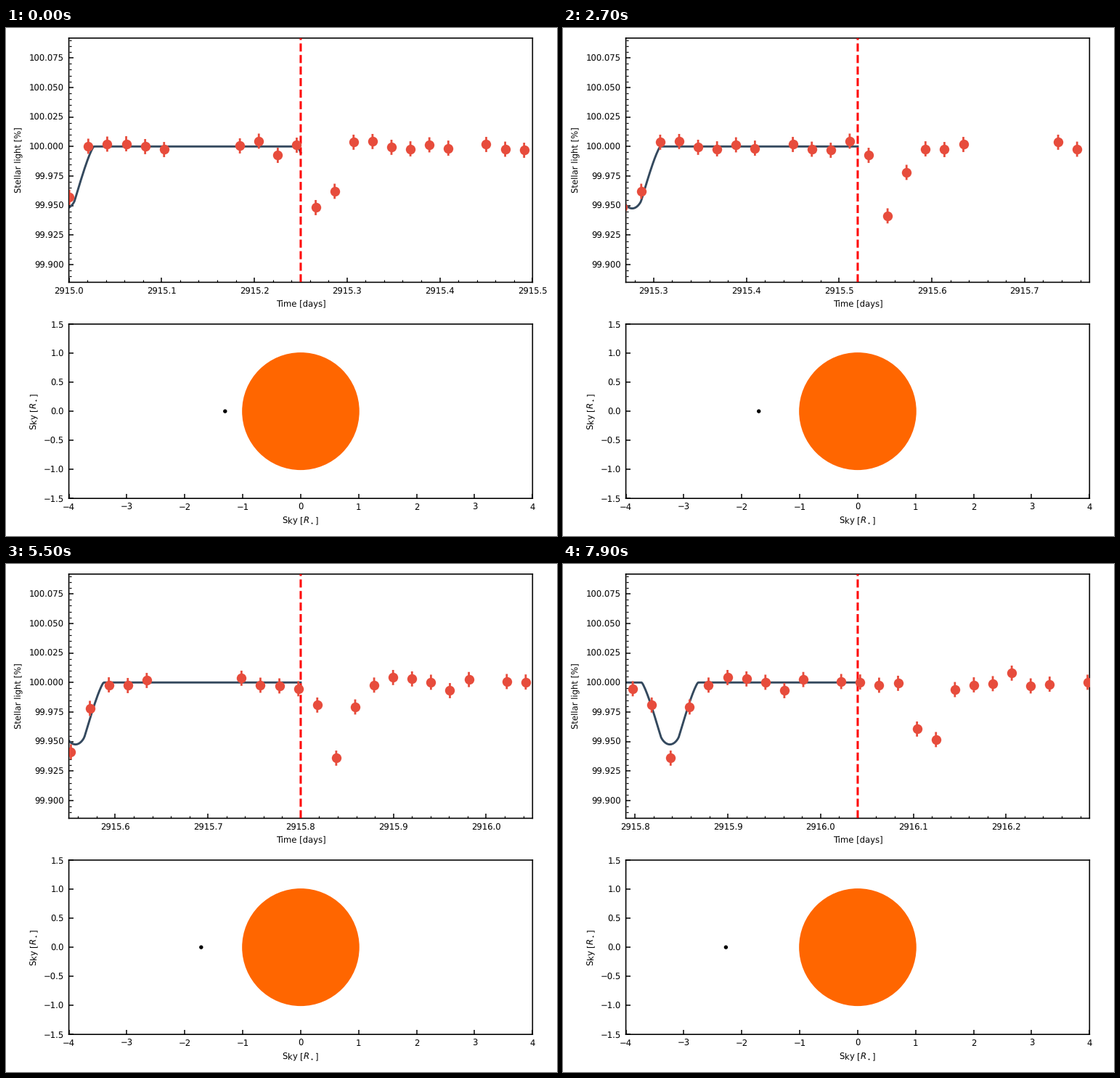
Recreate the animation shown at these times as a matplotlib script. Size 759x700 px, loop 8000 ms.

```python
import numpy as np
import matplotlib.pyplot as plt
from matplotlib.animation import FuncAnimation
from matplotlib.patches import Circle
from matplotlib.ticker import AutoMinorLocator, FormatStrFormatter, MultipleLocator

W, H, DPI = 759, 700, 64
FRAMES, INTERVAL = 80, 100

START, STEP, HALF_SPAN = 2915.25, 0.01, 0.25
PERIOD, T0, ORBIT = 0.28032, 2915.2768, 2.308
RATIO, LIMB = 0.0204, 0.7
CADENCE, FIRST = 0.020434, 2915.0005

INK, POINT, STAR = '#34495e', '#e74c3c', '#ff6600'
LEFT, RIGHT = 86.6, 725.3

# Observed flux in ppm; None marks a missing exposure
FLUX = [
    -431, 2, 20, 23, -1, -26, None, None, None, 5, 45, -75, 11, -517, -379, 36,
    42, -7, -20, 14, -14, None, 17, -23, -32, 45, -75, -587, -219, -20, -26, 17,
    None, None, None, None, 36, -23, -29, -53, -191, -640, -207, -22, 42, 30, 2, -69,
    25, None, 8, 4, -23, -7, -394, -483, -60, -20, -10, 79, -29, -14, None, 2,
]


def pt(pixels):
    return pixels * 72 / DPI


def add_axes(top, bottom):
    ax = fig.add_axes([LEFT / W, 1 - bottom / H, (RIGHT - LEFT) / W, (bottom - top) / H])
    ax.tick_params(direction='in', length=pt(6), width=pt(1.5), labelsize=pt(11.6))
    ax.tick_params(which='minor', direction='in', length=pt(3.2), width=pt(1.2))
    ax.tick_params(axis='x', pad=pt(7))
    ax.tick_params(axis='y', pad=pt(6.5))
    for spine in ax.spines.values():
        spine.set(linewidth=pt(1.6), snap=False)
    return ax


def label(x, y, text, rotation=0):
    fig.text(x / W, 1 - y / H, text, fontsize=pt(11.6), rotation=rotation,
             ha='center', va='center')


def orbit(t):
    """Sky position and depth along the line of sight."""
    phase = 2 * np.pi * (t - T0) / PERIOD
    return ORBIT * np.sin(phase), np.cos(phase)


def transit(t):
    """Limb-darkened flux in percent, averaged over one exposure."""
    exposure = np.linspace(-CADENCE / 2, CADENCE / 2, 81)
    x, depth = orbit(t[:, None] + exposure)
    x = np.abs(x)
    overlap = np.clip((1 + RATIO - x) / (2 * RATIO), 0, 1) * (depth > 0)
    mu = np.sqrt(np.clip(1 - x**2, 0, 1))
    light = (1 - LIMB * (1 - mu)) / (1 - LIMB / 3)
    return 100 * (1 - RATIO**2 * (overlap * light).mean(axis=1))


plt.rcParams.update({'font.family': 'DejaVu Sans', 'text.hinting': 'none'})
fig = plt.figure(figsize=(W / DPI, H / DPI), dpi=DPI, facecolor='white')

curve_ax = add_axes(13.9, 350.4)
curve_ax.set_ylim(99.8851, 100.0917)
curve_ax.xaxis.set_major_locator(MultipleLocator(0.1))
curve_ax.yaxis.set_major_locator(MultipleLocator(0.025))
curve_ax.xaxis.set_major_formatter(FormatStrFormatter('%.1f'))
curve_ax.yaxis.set_major_formatter(FormatStrFormatter('%.3f'))
curve_ax.xaxis.set_minor_locator(AutoMinorLocator(5))
curve_ax.yaxis.set_minor_locator(AutoMinorLocator(5))

sky_ax = add_axes(408, 648.2)
sky_ax.set_xlim(-4, 4)
sky_ax.set_ylim(-1.5, 1.5)
sky_ax.xaxis.set_major_locator(MultipleLocator(1))
sky_ax.yaxis.set_major_locator(MultipleLocator(0.5))

label(406, 380.5, 'Time [days]')
label(17.5, 182, 'Stellar light [%]', 90)
label(406, 679.5, r'Sky [$R_\star$]')
label(38.8, 528, r'Sky [$R_\star$]', 90)

days, flux = np.array([(FIRST + i * CADENCE, 100 + ppm * 1e-4)
                       for i, ppm in enumerate(FLUX) if ppm is not None]).T
curve_ax.vlines(days, flux - 0.0064, flux + 0.0064, color=POINT, lw=pt(2.8),
                snap=False, zorder=4)
curve_ax.scatter(days, flux, s=pt(13.4)**2, color=POINT, lw=0, zorder=4)

times = START - 0.3 + 0.001 * np.arange(1100)
fluxes = transit(times)
model, = curve_ax.plot([], [], color=INK, lw=pt(2.9), snap=False, zorder=2)
now_line = curve_ax.axvline(START, color='red', ls='--', lw=pt(3), snap=False, zorder=3)

sky_ax.add_patch(Circle((0, 0), 1, facecolor=STAR, edgecolor=STAR, lw=pt(1.9), zorder=2))
planet = sky_ax.add_patch(Circle((0, 0), 0.034, color='black', lw=0))


def update(frame):
    now = round(START + STEP * frame, 6)
    curve_ax.set_xlim(round(now - HALF_SPAN, 6), round(now + HALF_SPAN, 6))
    past = times <= now + 1e-6
    model.set_data(times[past], fluxes[past])
    now_line.set_xdata([now, now])
    x, depth = orbit(now)
    planet.center = (x, 0)
    planet.set_zorder(3 if depth > 0 else 1)
    return model, now_line, planet


anim = FuncAnimation(fig, update, frames=FRAMES, interval=INTERVAL,
                     repeat=True, repeat_delay=0, blit=False)
plt.show()
```
